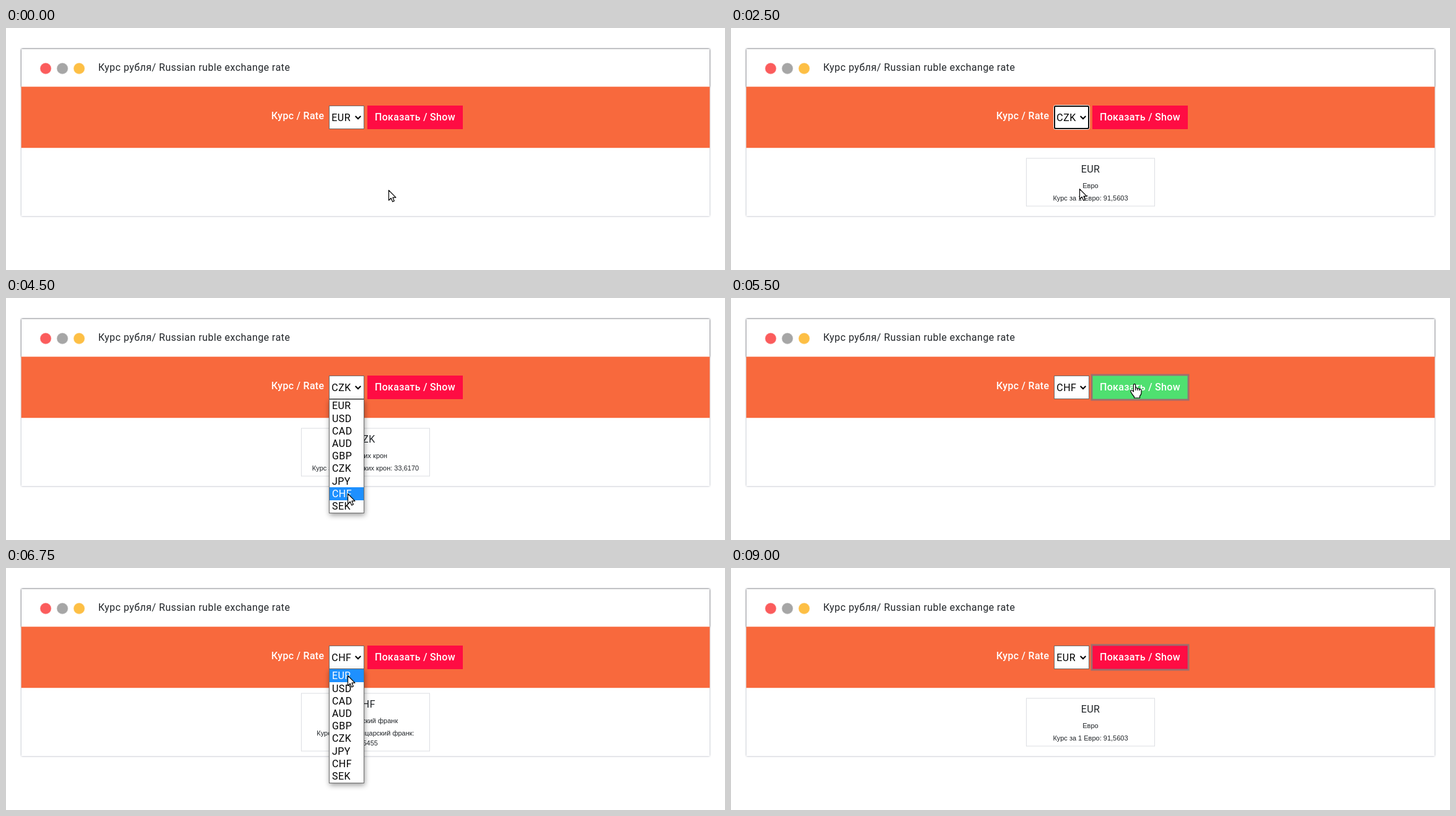
Recreate the animation shown at these times as an HTML page. Size 1160 px wide and 390 px high, loop 9750 ms.

```html
<!DOCTYPE html>
<html lang="ru">
<head>
<meta charset="utf-8">
<title>Курс рубля</title>
<style>
  html, body { margin: 0; width: 100%; height: 100%; overflow: hidden; background: #fff; }
  svg { display: block; width: 1160px; height: 390px; }
  text { font: 16px Roboto, Inter, sans-serif; letter-spacing: .43px; white-space: pre; }
  .light { fill: #fff; font-weight: 500; letter-spacing: .3px; }
  .dark { fill: #212529; }
  .small { font: 11px "Liberation Sans", Arial, sans-serif; letter-spacing: 0; }
  .pane { fill: #fff; filter: drop-shadow(0 0 1.5px rgba(60, 70, 100, .5)); }
  .bar { fill: #fff; filter: drop-shadow(0 0 1.5px rgba(0, 0, 0, .6)); }
  #menu > rect:first-child { filter: drop-shadow(1px 3px 4px rgba(0, 0, 0, .4)); }
  #card { text-anchor: middle; }
</style>
</head>
<body>
<svg viewBox="0 0 1160 390">
  <rect class="pane" x="25" y="34" width="1110" height="269"/>
  <rect class="bar" x="25" y="34" width="1110" height="61"/>
  <g id="lights"></g>
  <text class="dark" x="148.7" y="69">Курс рубля/ Russian ruble exchange rate</text>
  <rect x="24.6" y="94.6" width="1110.8" height="98.6" fill="#f8693d"/>
  <text class="light" x="428" y="147">Курс / Rate</text>

  <rect id="button" x="583" y="125" width="154" height="38"/>
  <rect id="outline" x="582" y="124" width="156" height="40" fill="none" stroke="#8a7078" stroke-opacity=".8" stroke-width="3"/>
  <text class="light" x="595" y="149">Показать / Show</text>

  <g id="card"></g>

  <rect x="521.5" y="125.5" width="56" height="37" fill="#fff" stroke="#6b6b6b"/>
  <g id="ring" fill="none">
    <rect x="520.5" y="124.5" width="58" height="39" rx="3" stroke="#fff"/>
    <rect x="522" y="126" width="55" height="36" rx="2" stroke="#101010" stroke-width="2"/>
  </g>
  <text id="value" x="525.3" y="149.5"></text>
  <path d="M563.7 142l4.3 4.3 4.3-4.3" fill="none" stroke="#000" stroke-width="2"/>

  <g id="menu">
    <rect x="521.5" y="163.5" width="56" height="183" fill="#fff" stroke="#6b6b6b"/>
    <rect id="mark" x="522" width="55" height="21" fill="#1e90ff"/>
  </g>

  <g id="cursor" stroke="#000" fill="#fff" stroke-width="1.2" stroke-linejoin="round">
    <path id="arrow" d="M.5.5V16.7L4.2 13.2 6.7 18.9 9.4 17.7 7 12.2H12Z"/>
    <g id="hand">
      <path d="M-1.6 1.2Q-1.6-.4 0-.4T1.6 1.2V6.2Q4 5 4.7 7 7 6 7.8 8 11 7.2 11 10V14Q11 17 8.5 19V22H-.5V20Q-2.6 18-4.6 14.6L-6 12Q-6.8 10.3-5.2 9.8-3.6 9.4-1.6 12Z"/>
      <path d="M1.6 6.5V10M4.7 7V10M7.8 8V10.5" fill="none"/>
    </g>
  </g>
</svg>

<script>
const LOOP = 9750, STEP = 250, FADE = 1000;
const ROW = 20.22, TOP = 163.5;
const BUTTON = { x: 651, y: 139 }, SELECT = { x: 551, y: 149 };
const REST = { x: 617, y: 261 }, EXIT = { x: 690, y: 330 };

const codes = ["EUR", "USD", "CAD", "AUD", "GBP", "CZK", "JPY", "CHF", "SEK"];
const cards = {
  EUR: ["Евро", "Курс за 1 Евро: 91,5603"],
  CZK: ["Чешских крон", "Курс за 10 Чешских крон: 33,6170"],
  CHF: ["Швейцарский франк", "Курс за 1 Швейцарский франк:", "84,5455"]
};

// The menu opens, a value is picked, and the button is clicked soon after.
const round = (code, open, pick) => ({ code, open, pick, click: pick + 2 * STEP });
const first = round("EUR", 0, 0);
const picks = [round("CZK", 1500, 2500), round("CHF", 4000, 5000), round("EUR", 6250, 7500)];
const rounds = [first, ...picks];

const $ = id => document.getElementById(id);
const show = (id, on) => { $(id).style.display = on ? "" : "none"; };
const last = (list, test) => list.filter(test).pop();

function add(parent, tag, attrs, content = "") {
  const el = document.createElementNS("http://www.w3.org/2000/svg", tag);
  for (const key in attrs) el.setAttribute(key, attrs[key]);
  el.textContent = content;
  parent.append(el);
  return el;
}

// The pointer's stops follow from the rounds.
const stops = [];
function stay(point, from, to) {
  stops.push({ ...point, t: from }, { ...point, t: to });
}
stay(REST, 0, 0);
stay(BUTTON, first.click, first.click + STEP);
for (const { code, open, pick, click } of picks) {
  const option = { x: SELECT.x, y: TOP + (codes.indexOf(code) + .48) * ROW };
  stay(SELECT, open - STEP, open);
  stay(option, open + 2 * STEP, pick - STEP);
  stay(BUTTON, click, click + STEP);
}
const leave = picks[2].click + 3 * STEP;
stay(EXIT, leave, LOOP);

function pointer(t) {
  const i = stops.findIndex(s => s.t > t);
  const a = stops[i - 1], b = stops[i];
  const p = ((t - a.t) / (b.t - a.t)) ** 2;
  return { x: a.x + (b.x - a.x) * p, y: a.y + (b.y - a.y) * p };
}

["#fb5c5c", "#a6a6a6", "#fdbf45"].forEach((fill, i) =>
  add($("lights"), "circle", { cx: 64 + 27 * i, cy: 65.3, r: 8.5, fill, stroke: fill, "stroke-opacity": .5, "stroke-width": 1.5 }));

const options = codes.map((code, i) =>
  add($("menu"), "text", { x: 526, y: TOP + 15.8 + i * ROW }, code));

const views = {};
for (const code in cards) {
  const lines = cards[code];
  const height = 45 + 16 * lines.length;
  const y = 248 - height / 2;
  const g = views[code] = add($("card"), "g", {});
  add(g, "rect", { x: 476.5, y: y + .5, width: 207, height, fill: "#fff", stroke: "#dcdee2" });
  add(g, "text", { x: 580, y: y + 23, class: "dark" }, code);
  lines.forEach((line, i) =>
    add(g, "text", { x: 580, y: y + (i ? 52 + 16 * i : 48), class: "dark small" }, line));
}

function draw(t) {
  const { x, y } = pointer(t);
  const picked = last(rounds, r => r.pick <= t);
  const clicked = last(rounds, r => r.click <= t);
  const open = picks.some(r => r.open <= t && t < r.pick);
  const hover = x >= 583 && x < 737 && y >= 125 && y < 163;

  $("button").setAttribute("fill", hover ? "#4fe070" : "#ff0c43");
  show("outline", clicked === picked && !open);
  show("ring", picked !== first && t < picked.click);
  $("value").textContent = picked.code;

  for (const code in views) {
    const on = clicked && clicked.code === code;
    views[code].style.opacity = on ? Math.min(1, (t - clicked.click) / FADE) ** 2 : 0;
  }

  show("menu", open);
  const row = y < TOP ? codes.indexOf(picked.code) : Math.min(8, Math.floor((y - TOP) / ROW));
  $("mark").setAttribute("y", Math.floor(TOP + row * ROW));
  options.forEach((el, i) => el.setAttribute("fill", i === row ? "#fff" : "#000"));

  show("cursor", t <= leave);
  show("arrow", !hover);
  show("hand", hover);
  $("cursor").setAttribute("transform", `translate(${Math.round(x)} ${Math.round(y)})`);
}

const start = performance.now();
function tick() {
  const t = (performance.now() - start) % LOOP;
  draw(Math.floor(t / STEP) * STEP);
  requestAnimationFrame(tick);
}
tick();
</script>
</body>
</html>
```
